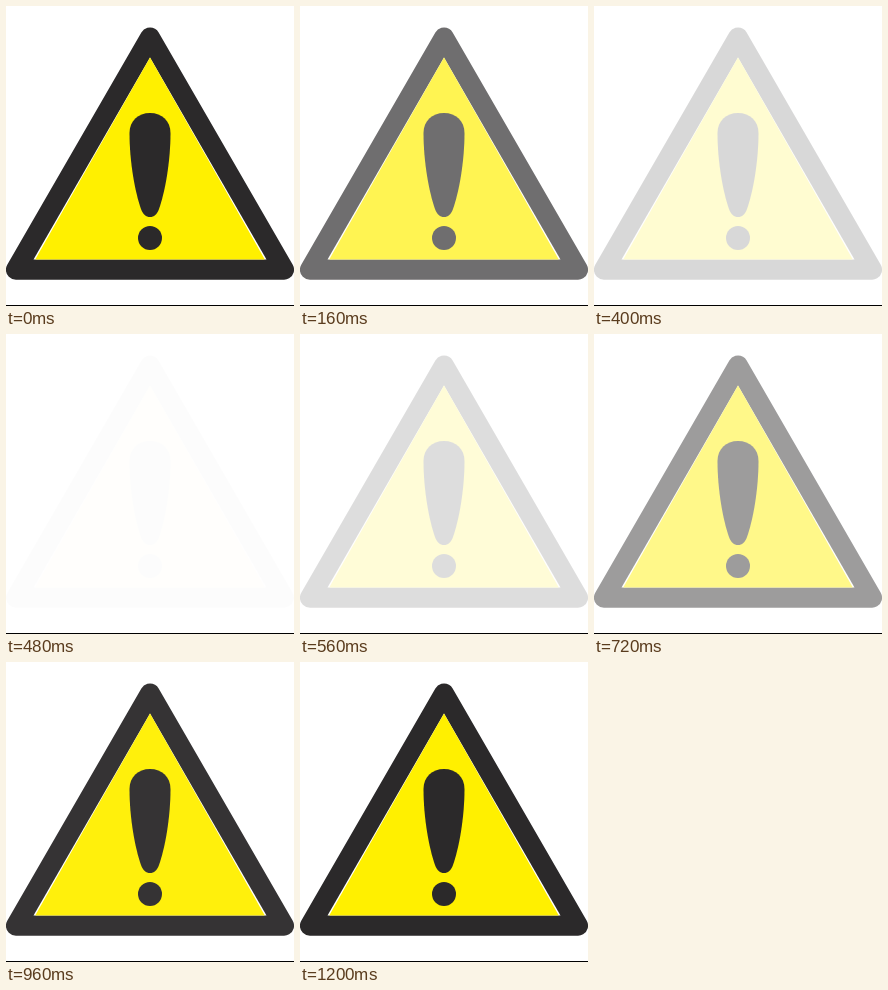
An HTML page that plays this animation: 288x300 px, repeating every 1360 ms.

```html
<!DOCTYPE html>
<html lang="en">
<head>
<meta charset="utf-8">
<title>Warning sign</title>
<style>
  html, body {
    margin: 0;
    width: 100%;
    height: 100%;
    overflow: hidden;
    background: #fff;
  }
  svg { display: block; width: 100%; height: 100%; }
  .ink { fill: #2b292a; }
  .sign { animation: pulse 1360ms step-end infinite; }

  /* 17 ticks of 80 ms: fade out, fade back in, hold */
  @keyframes pulse {
    0%      { opacity: 1; }
    5.88%   { opacity: .84; }
    11.76%  { opacity: .675; }
    17.64%  { opacity: .51; }
    23.52%  { opacity: .345; }
    29.41%  { opacity: .18; }
    35.29%  { opacity: .01; }
    41.17%  { opacity: .155; }
    47.05%  { opacity: .31; }
    52.94%  { opacity: .46; }
    58.82%  { opacity: .63; }
    64.7%   { opacity: .79; }
    70.58%  { opacity: .95; }
    76.47%, 100% { opacity: 1; }
  }
</style>
</head>
<body>
<svg viewBox="0 0 288 300" role="img" aria-label="Warning">
  <g class="sign">
    <path class="ink" stroke="#2b292a" stroke-width="20" stroke-linejoin="round"
          d="M144 31.5 L278.1 263.7 H9.9 Z"/>
    <path fill="#fff" d="M144 51.5 L260.5 253.5 H27.5 Z"/>
    <path fill="#fff000" d="M144 51.5 L258.8 253.5 H29.2 Z"/>
    <path class="ink" d="M144 107 C156 107 164.5 115 164.5 127 C164.5 156 159 186 153 203
      C151 208.5 148 211 144 211 C140 211 137 208.5 135 203
      C129 186 123.5 156 123.5 127 C123.5 115 132 107 144 107 Z"/>
    <circle class="ink" cx="144" cy="232" r="12"/>
  </g>
  <rect y="299" width="288" height="1"/>
</svg>
</body>
</html>
```
